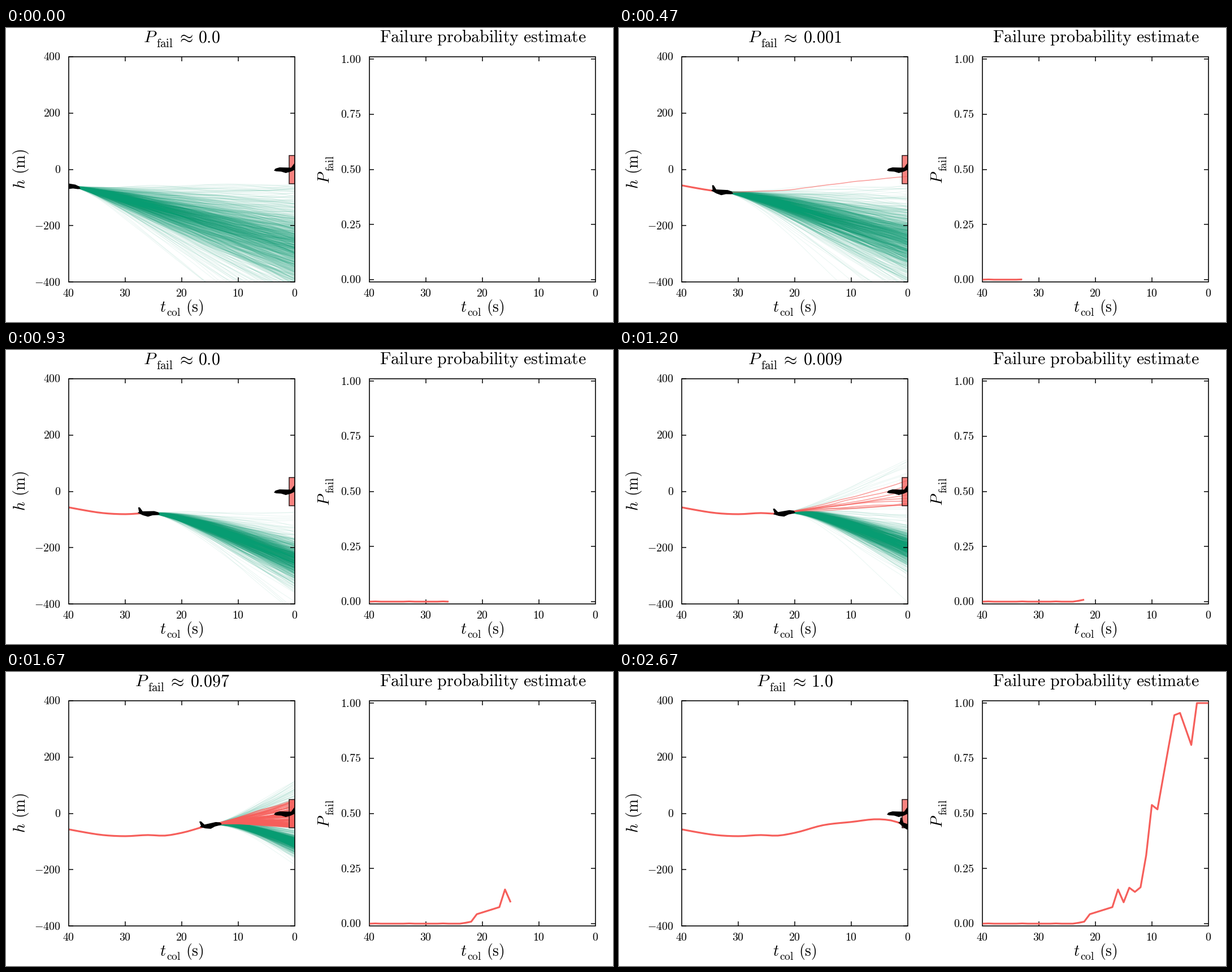
A matplotlib script for the animation above (3740 ms loop, 1074 by 521 pixels).

```python
import numpy as np
import matplotlib.pyplot as plt
from matplotlib.animation import FuncAnimation
from matplotlib.collections import LineCollection
from matplotlib.patches import Polygon, Rectangle

W, H, DPI = 1074, 521, 100
PT = 72 / DPI                      # points per pixel
GREEN, RED = "#079c72", "#f65f5b"
LOOP, TICK, LAST, RUNS = 3740, 20, 40, 1000
LAG = 5                            # seconds a run keeps its present climb rate
STARTS = np.round(np.arange(LAST + 1) * 20 / 3) * 10


def hermite(x, pts):
    """Smooth curve through a few points."""
    px, py = np.array(pts, float).T
    m = np.gradient(py, px)
    j = np.clip(np.searchsorted(px, x) - 1, 0, len(px) - 2)
    d = px[j + 1] - px[j]
    u = (x - px[j]) / d
    bend = (1 - u) * m[j] * d - u * m[j + 1] * d
    ease = u * u * (3 - 2 * u)
    return py[j] + (py[j + 1] - py[j]) * ease + u * (1 - u) * bend


# Altitude and failure estimate against elapsed seconds
SEC = np.arange(LAST + 1)
ALT = hermite(SEC, [(0, -57), (2, -64.5), (6, -77), (10, -81), (14, -77),
                    (17, -79), (20, -69), (25, -42), (30, -30.5), (35, -21),
                    (37, -25), (40, -45)])
SLOPE = np.gradient(ALT)
KEYS = [(16, 0), (18, .009), (19, .043), (23, .075), (24, .155), (25, .097),
        (26, .163), (27, .144), (28, .165), (29, .31), (30, .538), (31, .518),
        (33, .805), (34, .945), (35, .955), (37, .81), (38, 1)]
PROB = np.interp(SEC, *zip(*KEYS)) + .001 * ((SEC % 6 == 1) & (SEC < 16))
PROB = np.round(PROB, 3)

PLANE = np.array([(-17.5, -10.5), (-14.5, -10.5), (-9.5, -3.5), (11, -4),
                  (18, -2), (21, 1.5), (17, 3), (8, 3.5), (0, 6), (-9, 3.5),
                  (-18.5, -1), (-16, -2.5)])


def col_x(t):
    return 511 - 9.99 * np.asarray(t)


def alt_y(h):
    return 250.5 - .499 * np.asarray(h)


def prob_y(p):
    return 446 - 391 * np.asarray(p)


def swarm(k):
    """Possible futures after k seconds: safe runs and failing runs."""
    left = LAST - k
    if left == 0:
        return [], []
    rng = np.random.default_rng(700 + k)
    tau = np.arange(left + 1)
    hold = LAG * (1 - np.exp(-tau / LAG))
    coast = ALT[k] + SLOPE[k] * hold

    def paths(ends):
        rate = (ends - coast[-1]) / (left - hold[-1])
        h = coast + rate[:, None] * (tau - hold)
        walk = rng.normal(0, .5, h.shape).cumsum(axis=1)
        walk[:, 0] = 0
        walk = walk.cumsum(axis=1)
        h += walk - walk[:, -1:] * (tau / left) ** 2
        x = np.broadcast_to(col_x(left - tau), h.shape)
        return np.stack([x, alt_y(h)], axis=-1)

    fails = int(round(RUNS * PROB[k]))
    over = min(int(40 * np.exp(-((left - 16) / 5) ** 2)), RUNS - fails)
    under = RUNS - fails - over

    # Most runs dive below the other aircraft, a few climb above it
    early = np.clip((left - 29) / 5, 0, 1)
    dive = 2.4 * early - 8 + (1.5 + .6 * early) * rng.standard_t(5, under)
    low = coast[-1] + dive * (left - hold[-1])
    low = np.where(low > -52, -52 - .5 * (low + 52), low)
    high = 50 + 65 * rng.random(over) ** 1.6
    u = (np.arange(fails) + .5) / max(fails, 1)
    hit = -50 + min(100, 10 + 11 * left) * u ** 2
    return paths(np.concatenate([low, high])), paths(hit)


SWARMS = [swarm(k) for k in SEC]

plt.rcParams["mathtext.fontset"] = "cm"
fig = plt.figure(figsize=(W / DPI, H / DPI), dpi=DPI, facecolor="white")


def layer(x0, y0, x1, y1):
    ax = fig.add_axes([x0 / W, 1 - y1 / H, (x1 - x0) / W, (y1 - y0) / H])
    ax.set_xlim(x0, x1)
    ax.set_ylim(y1, y0)
    ax.axis("off")
    return ax


sky = layer(111, 51, 511, 450)
page = layer(0, 0, W, H)


def line(ax, x, y, color, width):
    return ax.plot(x, y, color=color, lw=width * PT, zorder=3,
                   solid_capstyle="butt", solid_joinstyle="round")[0]


def label(x, y, s, size, ha="left", rot=0):
    return page.text(x, y, f"${s}$", fontsize=size * PT, ha=ha, va="baseline",
                     rotation=rot, rotation_mode="anchor")


def frame(x0, x1, marks):
    y0, y1 = 51, 450
    page.add_patch(Rectangle((x0, y0), x1 - x0, y1 - y0, fill=False,
                             ec="black", lw=1.6 * PT))
    for k in range(5):
        x = x0 + (x1 - x0) * k / 4
        label(x, 476.5, str(40 - 10 * k), 20, "center")
        if 0 < k < 4:
            line(page, [x, x], [y0, y0 + 8], "black", 1.5)
            line(page, [x, x], [y1, y1 - 8], "black", 1.5)
    for y, name in marks:
        label(x0 - 14, y + 6.5, name, 20, "right")
        line(page, [x0, x0 + 8], [y, y], "black", 1.5)
        line(page, [x1, x1 - 8], [y, y], "black", 1.5)
    mid = (x0 + x1) / 2
    label(mid - 38.5, 503, "t", 28)
    label(mid - 27, 510, r"\mathrm{col}", 19.6)
    label(mid + 7, 503, r"\mathrm{(s)}", 28)


frame(111, 510.5, [(alt_y(h), str(h)) for h in range(-400, 401, 200)])
frame(643, 1042.5, [(prob_y(p), f"{p:.2f}") for p in np.linspace(0, 1, 5)])
label(33.5, 285, "h", 28, rot=90)
label(33.5, 259, r"\mathrm{(m)}", 28, rot=90)
label(572.5, 276, "P", 28, rot=90)
label(579.5, 254.5, r"\mathrm{fail}", 19.6, rot=90)
label(843.5, 25, r"\mathrm{Failure\ probability\ estimate}", 30, "center")

title = [(label(0, 25, "P", 30), 243),
         (label(0, 33.5, r"\mathrm{fail}", 21), 266),
         (label(0, 25, r"\approx", 30), 301.5),
         (label(0, 25, "0.0", 30), 340.5)]

green = LineCollection([], colors=GREEN, alpha=.08, linewidths=1.1 * PT)
red = LineCollection([], colors=RED, alpha=.6, linewidths=1.6 * PT)
for z, runs in enumerate((green, red)):
    runs.set_zorder(1 + z)
    sky.add_collection(runs, autolim=False)
track = line(sky, [], [], RED, 3.2)
sky.add_patch(Rectangle((501, 225.5), 10, 50, fc=RED, alpha=.78, zorder=4))
sky.add_patch(Rectangle((501, 225.5), 10, 50, fill=False, ec="#2b1a1a",
                        lw=1.5 * PT, zorder=5))
sky.add_patch(Polygon(PLANE * (-1, 1) + (495, 251), fc="black", lw=0,
                      zorder=6))
own = sky.add_patch(Polygon(PLANE, fc="black", lw=0, zorder=7))
curve = line(page, [], [], RED, 3.2)


def update(i):
    now = i * TICK + TICK / 2
    k = int(np.searchsorted(STARTS, now, side="right")) - 1
    past = SEC[:k + 1]

    safe, fail = SWARMS[k]
    green.set_segments(safe)
    red.set_segments(fail)
    track.set_data(col_x(LAST - past), alt_y(ALT[:k + 1]))
    curve.set_data(643.5 + 9.975 * past, prob_y(PROB[:k + 1]))

    a = -np.arctan(SLOPE[k] * .05)
    c, s = np.cos(a), np.sin(a)
    own.set_xy(PLANE @ np.array([(c, s), (-s, c)])
               + (col_x(LAST - k), alt_y(ALT[k]) + .5))

    value = str(float(PROB[k]))
    for part, x in title:
        part.set_x(x - 7.5 * (len(value) - 3))
    title[-1][0].set_text(f"${value}$")
    return green, red, track, curve, own


anim = FuncAnimation(fig, update, frames=LOOP // TICK, interval=TICK,
                     init_func=lambda: update(0), repeat=True, repeat_delay=0,
                     blit=False)
plt.show()
```
